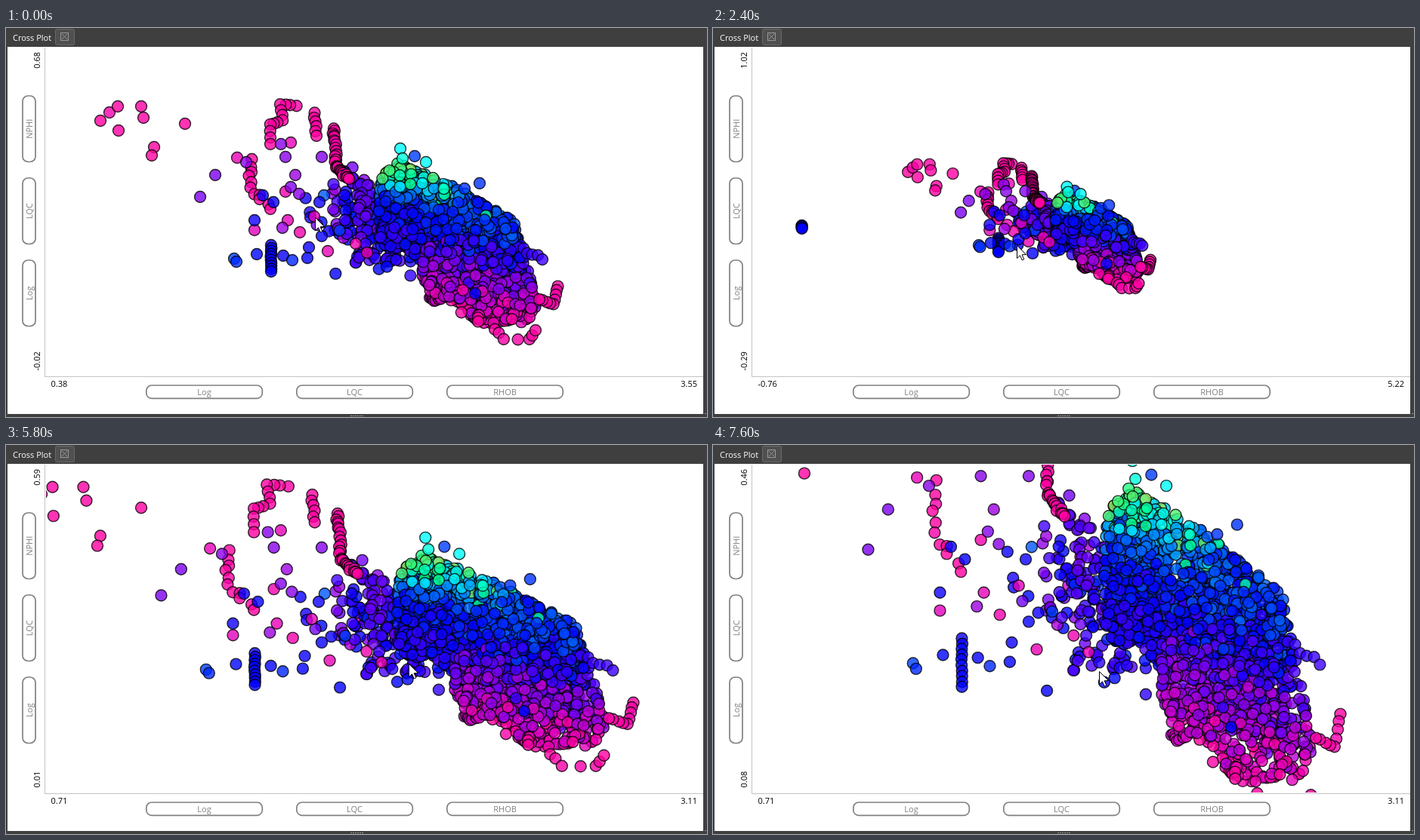
Animation of 928 by 516 pixels, one loop 8 s. Source, as an HTML page with a canvas:

```html
<!DOCTYPE html>
<html>
<head>
<meta charset="utf-8">
<style>
html, body { margin: 0; width: 100%; height: 100%; overflow: hidden; background: #3f3f3f; }
canvas { display: block; }
</style>
</head>
<body>
<canvas id="stage" width="928" height="516"></canvas>
<script>
const g = document.getElementById('stage').getContext('2d');
const LOOP = 8000, STEP = 200;
const PLOT = { x: 53, y: 26, w: 870, h: 436 };
const HOME = [.3875, 3.5575, -.02, .6818];

// time, then axis limits: x min, x max, y min, y max
const ZOOM = [
  [0, ...HOME],
  [1000, .2577, 3.7222, -.0601, .708],
  [2400, -.7601, 5.2201, -.295, 1.0254],
  [3200, .275, 3.732, -.067, .6988],
  [3600, .7101, 3.1115, .0306, .5625],
  [5600, .7101, 3.1115, .0306, .5625],
  [5800, .7101, 3.1115, .0106, .5962],
  [6800, .7101, 3.1115, -.2725, 1.0478],
  [7600, .7101, 3.1115, .0801, .4618]
];
// time, x, y
const POINTER = [[0, 409, 251], [1000, 402, 270], [2400, 402, 288], [3200, 410, 279],
  [3600, 411, 281], [4200, 731, 410], [4800, 560, 258], [5600, 560, 258],
  [5800, 533, 290], [6800, 516, 298], [7600, 511, 300]];

// from lime through cyan, blue and violet to pink
const RAMP = [[150, 230, 90], [0, 255, 140], [0, 255, 255], [0, 135, 255], [0, 70, 255],
  [0, 0, 255], [75, 0, 255], [145, 0, 230], [215, 0, 200], [255, 0, 160]];

const mix = (a, b, u) => a + (b - a) * u;
const clamp = (v, lo, hi) => Math.max(lo, Math.min(hi, v));

let seed = 7;
function rnd() {
  seed = (seed * 1664525 + 1013904223) % 4294967296;
  return seed / 4294967296;
}
const spread = s => (rnd() + rnd() + rnd() - 1.5) * s;

function color(v) {
  v = clamp(v, 0, 8.999);
  const i = Math.floor(v);
  return `rgb(${RAMP[i].map((c, k) => Math.round(mix(c, RAMP[i + 1][k], v - i)))})`;
}

// dots are placed in stage pixels of the home view
const dots = [];
const add = (x, y, v) => dots.push([x, y, color(v)]);

// dots along a bent line, `per` on each stretch
function trail(v, per, jitter, ...p) {
  for (let i = 0; i < p.length - 2; i += 2)
    for (let k = 0; k < per; k++)
      add(mix(p[i], p[i + 2], k / per) + spread(jitter),
        mix(p[i + 1], p[i + 3], k / per) + spread(jitter), v + spread(.3));
  add(...p.slice(-2), v);
}

function cloud(n, x, y, rx, ry, v, dv) {
  while (n--) add(x + spread(rx), y + spread(ry), v + spread(dv));
}

function curve(pts, x) {
  let i = 0;
  while (i < pts.length - 4 && x > pts[i + 2]) i += 2;
  return mix(pts[i + 1], pts[i + 3], (x - pts[i]) / (pts[i + 2] - pts[i]));
}

const TOP = [493, 200, 520, 178, 600, 214, 672, 256, 704, 362];
const BOTTOM = [493, 285, 546, 303, 554, 345, 600, 366, 625, 392, 690, 390, 704, 364];

function body(n) {
  while (n > 0) {
    const x = mix(493, 704, rnd()), y = mix(165, 402, rnd());
    if (y < curve(TOP, x) || y > curve(BOTTOM, x)) continue;
    const depth = y - .25 * (x - 600) - 255;
    if ((depth > 95 || x > 675) && rnd() < .6) continue;
    // a cyan cap on the upper left, violet to pink below
    const cap = clamp((630 - x) / 50, 0, 1);
    let v = 4.2 + depth * (depth > 0 ? .037 : .05 * cap) + spread(1.2);
    if (x < 550) v = Math.min(v, 5 + rnd());
    if (v < 2.8 && rnd() < .3) v -= 1.5;
    add(x, y, v);
    n--;
  }
}

function build() {
  cloud(45, 478, 238, 36, 36, 6.2, 2.2);
  cloud(45, 488, 270, 44, 32, 5.5, 1.2);
  cloud(32, 448, 250, 44, 44, 5.9, 2);
  cloud(26, 505, 302, 55, 22, 5.4, .8);
  trail(6.3, 10, 9, 450, 190, 468, 215, 476, 250);
  trail(8, 10, 4, 562, 358, 576, 359);
  body(1650);

  // pink arms
  trail(9, 1, 0, 125, 123, 137, 112, 148, 104, 149, 136, 179, 104, 182, 119, 237, 127, 196, 158, 193, 169);
  trail(9, 3, 1, 384, 103, 363, 101, 366, 123, 349, 128, 350, 154);
  trail(9, 5, 1, 408, 112, 411, 143);
  trail(9, 15, 2, 434, 132, 437, 183, 454, 200);
  trail(9, 5, 3, 324, 176, 324, 213, 350, 240);
  trail(8.5, 1, 0, 306, 172, 377, 152, 370, 217, 329, 268, 373, 255, 389, 271, 426, 296, 408, 250, 463, 286, 478, 298);
  trail(8.8, 4, 1, 731, 342, 725, 366, 706, 360);
  trail(9, 2, 2, 602, 376, 646, 400, 660, 412, 694, 414, 701, 401);

  // violet and blue strays
  trail(6.8, 1, 0, 257, 224, 277, 195, 318, 178, 364, 154, 370, 171, 383, 195, 377, 211, 388, 220, 366, 265, 418, 171);
  trail(5.8, 4, 2, 684, 294, 710, 307);
  trail(5, 9, .5, 351, 288, 351, 323);
  trail(5, 1, 0, 329, 255, 340, 222, 354, 231, 332, 300, 367, 302, 399, 305, 401, 291, 415, 231, 418, 276, 621, 352);
  trail(4.3, 1, 0, 302, 306, 305, 310, 379, 308, 541, 170, 607, 213, 627, 206);
  trail(2, 1, 0, 522, 160, 525, 173, 556, 178);
  trail(5, 3, 1, -140, 256, -140, 264);
}

// neighbouring keys and the share between them
function span(keys, t) {
  let i = 0;
  while (i < keys.length - 2 && t >= keys[i + 1][0]) i++;
  const p = keys[i], q = keys[i + 1];
  return [p, q, Math.min(1, (t - p[0]) / (q[0] - p[0]))];
}

// the axis range grows or shrinks geometrically
function limits(t, k) {
  const [p, q, u] = span(ZOOM, t);
  const r = (q[k + 1] - q[k]) / (p[k + 1] - p[k]);
  const w = r === 1 ? u : (Math.pow(r, u) - 1) / (r - 1);
  return [mix(p[k], q[k], w), mix(p[k + 1], q[k + 1], w)];
}

const label = v => (Math.trunc(v * 100 + Math.sign(v) * 1e-6) / 100).toFixed(2);

function rect(x, y, w, h, fill) {
  g.fillStyle = fill;
  g.fillRect(x, y, w, h);
}

function text(s, x, y, fill, align = 'left', up = false) {
  g.save();
  g.translate(x, y);
  if (up) g.rotate(-Math.PI / 2);
  g.fillStyle = fill;
  g.textAlign = align;
  g.fillText(s, 0, 0);
  g.restore();
}

function pill(x, y, w, h, s, up) {
  g.strokeStyle = '#808080';
  g.lineWidth = 1.7;
  g.beginPath();
  g.roundRect(x, y, w, h, 7);
  g.stroke();
  text(s, x + w / 2 + (up ? 4 : 0), y + h / 2 + (up ? 0 : 4), '#808080', 'center', up);
}

function panel() {
  rect(0, 0, 928, 516, '#3f3f3f');
  rect(2, 25, 921, 487, '#fff');
  text('Cross Plot', 9, 17, '#fff');

  g.lineWidth = 1;
  g.fillStyle = '#505050';
  g.strokeStyle = '#6a6a6a';
  g.beginPath();
  g.roundRect(65.5, 1.5, 25, 21, 2);
  g.fill();
  g.stroke();
  g.strokeStyle = '#999';
  g.strokeRect(72.5, 6.5, 10, 10);
  g.beginPath();
  g.moveTo(74, 8); g.lineTo(81, 15);
  g.moveTo(81, 8); g.lineTo(74, 15);
  g.stroke();

  for (let i = 0; i < 6; i++) rect(456 + 3 * i, 514, 2, 1, '#999');
  rect(925, 511, 2, 1, '#999');

  rect(51, 26, 1, 437, '#c4c4c4');
  rect(51, 462, 872, 1, '#c4c4c4');
  ['NPHI', 'LQC', 'Log'].forEach((s, i) => pill(22, 90 + 109 * i, 17, 87.5, s, true));
  ['Log', 'LQC', 'RHOB'].forEach((s, i) => pill(185.8 + 199 * i, 474, 153.5, 17.3, s, false));
}

function pointer(x, y) {
  g.beginPath();
  [[0, 0], [0, 17], [4, 13.3], [6.8, 19.5], [9.3, 18.3], [6.6, 12.3], [12, 12]]
    .forEach(([dx, dy]) => g.lineTo(x + .5 + dx, y + .5 + dy));
  g.closePath();
  g.fillStyle = '#fff';
  g.strokeStyle = '#000';
  g.lineWidth = 1;
  g.fill();
  g.stroke();
}

function draw(t) {
  const [x0, x1] = limits(t, 1), [y0, y1] = limits(t, 3);
  g.font = '11px "Open Sans", "Noto Sans", sans-serif';
  panel();
  text(label(x0), 59.5, 476, '#000');
  text(label(x1), 915, 476, '#000', 'right');
  text(label(y1), 45, 32, '#000', 'right', true);
  text(label(y0), 45, 454.5, '#000', 'left', true);

  const [hx0, hx1, hy0, hy1] = HOME;
  const ax = (hx1 - hx0) / (x1 - x0), ay = (hy1 - hy0) / (y1 - y0);
  const bx = PLOT.x + (hx0 - x0) / (x1 - x0) * PLOT.w;
  const by = PLOT.y + (y1 - hy1) / (y1 - y0) * PLOT.h;

  g.save();
  g.beginPath();
  g.rect(PLOT.x, PLOT.y, PLOT.w, PLOT.h - 1);
  g.clip();
  g.globalAlpha = .8;
  g.strokeStyle = '#000';
  g.lineWidth = 1.4;
  for (const [x, y, fill] of dots) {
    g.fillStyle = fill;
    g.beginPath();
    g.arc(bx + (x - PLOT.x) * ax, by + (y - PLOT.y) * ay, 7.5, 0, 2 * Math.PI);
    g.fill();
    g.stroke();
  }
  g.restore();

  const [p, q, u] = span(POINTER, t);
  pointer(mix(p[1], q[1], u), mix(p[2], q[2], u));
}

build();
let shown = -1;
const start = performance.now();
function tick() {
  const t = Math.floor((performance.now() - start) % LOOP / STEP) * STEP;
  if (t !== shown) draw(shown = t);
  requestAnimationFrame(tick);
}
tick();
</script>
</body>
</html>
```
